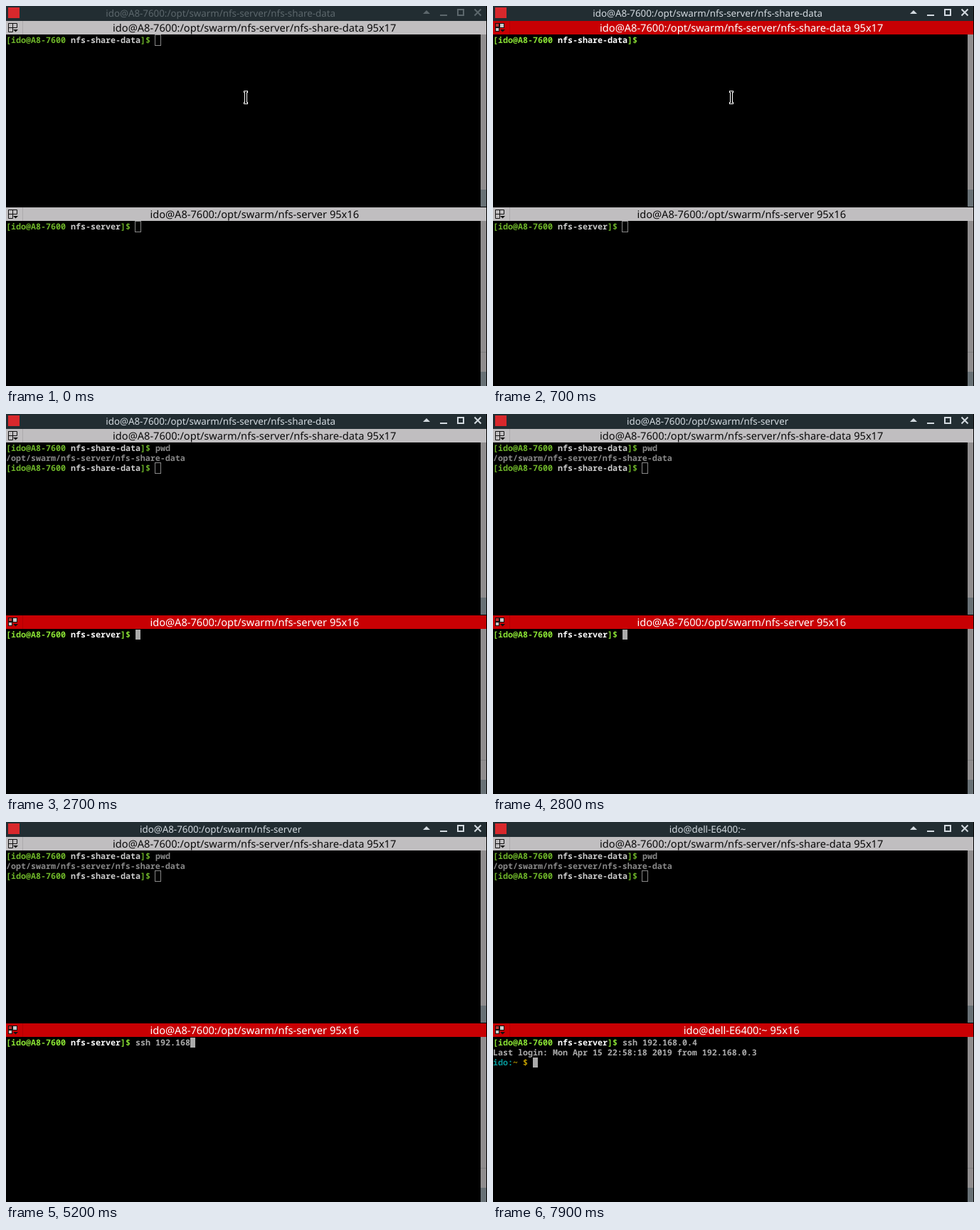
These frames come from a looping animation (676 px wide and 534 px high, 8 s). An HTML page:

```html
<!DOCTYPE html>
<html lang="en">
<head>
<meta charset="utf-8">
<title>Split terminal</title>
<style>
  html, body { margin: 0; width: 676px; height: 534px; overflow: hidden; background: #000; }
  svg { display: block; }
  text { white-space: pre; text-rendering: geometricPrecision; }
  .ui { font-family: "Noto Sans", sans-serif; text-anchor: middle; }
  .term { font: 600 11.667px "Noto Sans Mono", monospace; }
</style>
</head>
<body>
<svg id="stage" width="676" height="534" viewBox="0 0 676 534"></svg>
<script>
const LOOP = 8000, CELL = 7, ROW = 14, WIDTH = 675;
const GREEN = '#8ae234', WHITE = '#fff', GREY = '#aaa', CYAN = '#06989a', YELLOW = '#c4a000';
const HOST = 'ido@A8-7600', BASE = '/opt/swarm/nfs-server', SHARE = BASE + '/nfs-share-data';
const REMOTE = 'ido@dell-E6400:~';

const PWD_KEYS = [1000, 1100, 1200];
const SSH_KEYS = [3200, 3400, 3600, 3700, 3900, 4000, 4300, 4500, 4600, 5000,
                  5200, 5300, 5400, 5700, 6900];
const CURSOR_OFF = [[700, 1000], [1900, 2100], [6300, 6900]];

const stage = document.getElementById('stage');
const rect = (x, y, w, h, fill, extra = '') =>
  `<rect x="${x}" y="${y}" width="${w}" height="${h}" fill="${fill}" ${extra}/>`;
const path = (d, stroke, width = 1, fill = 'none') =>
  `<path d="${d}" fill="${fill}" stroke="${stroke}" stroke-width="${width}"/>`;
const label = (x, y, size, fill, text) =>
  `<text class="ui" x="${x}" y="${y}" font-size="${size}" fill="${fill}">${text}</text>`;
const typed = (text, keys, t) => text.slice(0, keys.filter(k => k <= t).length);

const prompt = dir => [[GREEN, `[${HOST} `], [WHITE, dir], [GREEN, ']$ ']];

function topLines(t) {
  const ps = prompt('nfs-share-data');
  const lines = [[...ps, [GREY, typed('pwd', PWD_KEYS, t)]]];
  if (t >= 1300) lines.push([[GREY, SHARE]], ps);
  return lines;
}

function bottomLines(t) {
  const lines = [[...prompt('nfs-server'), [GREY, typed('ssh 192.168.0.4', SSH_KEYS, t)]]];
  if (t >= 7600) lines.push([[GREY, 'Last login: Mon Apr 15 22:58:18 2019 from 192.168.0.3']]);
  if (t >= 7900) lines.push([[CYAN, 'ido:'], [YELLOW, '~ $ ']]);
  else if (t >= 7400) lines.push([]);
  return lines;
}

function groupIcon(y, active) {
  const arrow = path(`M10 ${y + 13}h7l-3.5 3.5z`, 'none', 0, '#111');
  if (!active) {
    return path(`M3.5 ${y + 4.5}h12v6h-12zv12h6v-12`, '#111') + arrow;
  }
  return rect(3, y + 4, 6, 6, '#111') + rect(4, y + 5, 4, 4, '#b33')
    + rect(9, y + 4, 7, 7, '#111') + rect(10, y + 5, 5, 5, '#c8c8c8')
    + rect(3, y + 10, 6, 6, '#111') + rect(4, y + 11, 4, 4, '#c8c8c8')
    + arrow;
}

function pane(y, title, lines, active, cursorOn) {
  let out = rect(0, y, WIDTH, 19, active ? '#c80003' : '#c0bec0')
    + rect(23, y, 1, 19, '#000', 'opacity=".1"')
    + groupIcon(y - 1, active)
    + label(349.2, y + 15, 14.6, active ? '#fff' : '#0a0a0a', title);
  const top = y + 20;
  let col = 0;
  out += `<g opacity="${active ? 1 : 0.8}">`;
  lines.forEach((line, row) => {
    col = 0;
    for (const [fill, text] of line) {
      out += `<text class="term" x="${col * CELL}" y="${top + row * ROW + 11}" fill="${fill}">${text}</text>`;
      col += text.length;
    }
  });
  const cx = col * CELL, cy = top + (lines.length - 1) * ROW;
  if (!active) out += rect(cx - 0.5, cy - 0.5, 8, 15, 'none', `stroke="${GREY}"`);
  else if (cursorOn) out += rect(cx, cy, CELL, ROW, GREY);
  return out + '</g>';
}

function titleBar(title, active) {
  const ink = active ? '#d3dae0' : '#5c676c';
  return rect(0, 0, WIDTH, 21, '#222d32')
    + rect(3, 2, 16, 15, '#d8282c')
    + label(301.6, 15, 13.333, ink, title)
    + path('M586 11L591 6L596 11z', 'none', 0, ink)
    + rect(610, 12, 10, 2, ink)
    + path('M635 5h8v8h-8z', ink, 2)
    + path('M658.5 4.5l9 9m0-9l-9 9', ink, 2);
}

const scrollbar = (y, h, thumb) =>
  rect(667, y, 8, h, '#8f8d8e') + rect(667, thumb, 8, y + h - thumb, '#687176');

function pointer(x) {
  const beam = (color, inset) =>
    [119, 135].map(y => rect(x - 3 + inset, y + inset, 6 - 2 * inset, 3 - 2 * inset, color)).join('')
    + rect(x - 2 + inset, 119 + inset, 4 - 2 * inset, 19 - 2 * inset, color);
  return beam('#fff', 0) + beam('#000', 1);
}

function scene(t) {
  const focus = t < 100 ? '' : t < 2700 ? 'top' : 'bottom';
  const cursorOn = !CURSOR_OFF.some(([from, to]) => t >= from && t < to);
  const remote = t >= 7900;
  const title = remote ? REMOTE : `${HOST}:${t < 2800 ? SHARE : BASE}`;
  const bottomTitle = remote ? REMOTE : `${HOST}:${BASE}`;
  return rect(0, 0, 676, 534, '#000')
    + titleBar(title, focus)
    + pane(21, `${HOST}:${SHARE} 95x17`, topLines(t), focus === 'top', cursorOn)
    + pane(283, `${bottomTitle} 95x16`, bottomLines(t), focus === 'bottom', cursorOn)
    + scrollbar(40, 242, 258) + scrollbar(302, 232, 514)
    + rect(667, 486, 8, 1, '#7c7c7d')
    + (t < 1000 ? pointer(t < 100 ? 337 : t < 300 ? 336 : 335) : '');
}

let shown = '';
function tick(now) {
  const next = scene(now % LOOP);
  if (next !== shown) stage.innerHTML = shown = next;
  requestAnimationFrame(tick);
}
tick(0);
</script>
</body>
</html>
```
